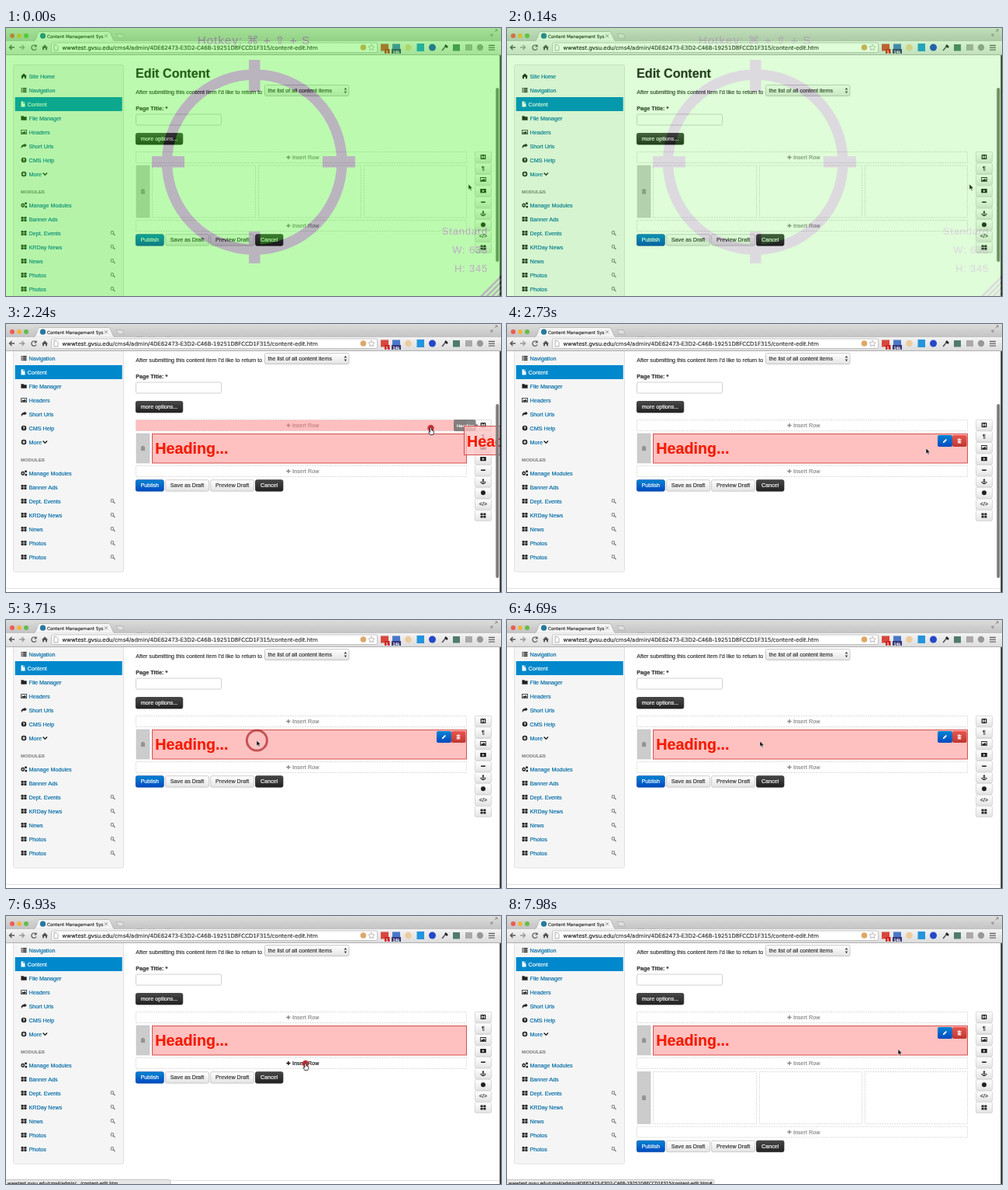
Recreate the animation shown at these times as an HTML page. Size 638x345 px, loop 8 s.

```html
<!DOCTYPE html>
<html lang="en">
<head>
<meta charset="utf-8">
<title>Content editor</title>
<style>
html, body { margin: 0; width: 100%; height: 100%; overflow: hidden; background: #fff; }
svg { display: block; width: 638px; height: 345px; }
text { font: 7.2px "Liberation Sans", Arial, sans-serif; color: #333; fill: currentColor; stroke: currentColor; stroke-width: .18px; white-space: pre; }
.ui { font-family: "DejaVu Sans", sans-serif; }
.link { color: #006aa6; }
.bold { font-weight: bold; }
.dash { fill: none; stroke: #d2d2d2; stroke-width: .8; stroke-dasharray: 2 1.2; }
.big { font-size: 19.7px; font-weight: bold; color: #f31c00; }
.sight text { color: inherit; font-size: 13px; letter-spacing: .8px; text-anchor: end; }
.sight .hot { font-size: 15px; letter-spacing: 1.1px; text-anchor: middle; font-family: "Liberation Sans", "DejaVu Sans", sans-serif; }
#sight { mix-blend-mode: multiply; }
</style>
</head>
<body>
<svg id="stage" viewBox="0 0 638 345" xmlns="http://www.w3.org/2000/svg"></svg>
<script>
const disc = 'M-3.3 0a3.3 3.3 0 1 0 6.6 0a3.3 3.3 0 1 0-6.6 0Z';
const icons = {
  home: 'M-4 .3L0-3.5 4 .3H3V3.3H1V1H-1V3.3H-3V.3Z',
  list: 'M-3.5-3h1.3v1.4h-1.3zM-1.5-3h5v1.4h-5zM-3.5-.7h1.3v1.4h-1.3zM-1.5-.7h5v1.4h-5zM-3.5 1.6h1.3v1.4h-1.3zM-1.5 1.6h5v1.4h-5z',
  file: 'M-2.5-3.4H.3V-.8H2.5V3.4H-2.5ZM.9-3.4L2.5-1.5H.9Z',
  folder: 'M-3.6-2.7H-.6L.2-1.8H3.6V2.7H-3.6Z',
  image: 'M-3.8-3H3.8V3H-3.8ZM-3-2.2V2.2H3V-2.2ZM-2.6 1.8V.8L-1.3-.4-.5.3 1-1.3 2.6.5V1.8Z',
  share: 'M3.8-1L.8-3.4V-2C-2.5-2-4 0-3 3.2-2.3 1 -1 .3.8.3V1.6Z',
  help: disc + 'M-1.3-.6Q-1.2-2 .1-2 1.5-1.8 1.4-.7 1.3 0 .5.4V.9H-.5V0Q.5-.4.4-.8 0-1.4-.4-.6ZM-.5 1.4H.5V2.3H-.5Z',
  more: disc + 'M-.6-2H.6V-.6H2V.6H.6V2H-.6V.6H-2V-.6H-.6Z',
  gears: 'M-3.8.3L-3-1.8-1.3-2.4.4-1.8 1.2.3.4 2.2-1.3 3-3 2.2ZM-2.3.3a1 1 0 1 0 2 0a1 1 0 1 0-2 0ZM1-2.2a1.5 1.5 0 1 0 3 0a1.5 1.5 0 1 0-3 0ZM1.4 2.2a1.4 1.4 0 1 0 2.8 0a1.4 1.4 0 1 0-2.8 0Z',
  grid: 'M-3.4-3h3v2.7h-3zM.4-3h3v2.7h-3zM-3.4.3h3v2.7h-3zM.4.3h3v2.7h-3z',
  search: 'M-2.9-.6a2.3 2.3 0 1 0 4.6 0a2.3 2.3 0 1 0-4.6 0ZM-2-.6a1.4 1.4 0 1 1 2.8 0a1.4 1.4 0 1 1-2.8 0ZM.6 1.4L1.4.6 3.4 2.6 2.6 3.4Z',
  trash: 'M-2.6-2.2H-1V-3H1V-2.2H2.6V-1.5H-2.6ZM-2.2-1H2.2V3H-2.2ZM-1.4-.4V2.4H-1V-.4ZM-.2-.4V2.4H.2V-.4ZM1-.4V2.4H1.4V-.4Z',
  pencil: 'M-2.7 2.7L-2.3 1 1.2-2.5 2.5-1.2-1 2.3Z',
  head: 'M-3.3-3H3.3V3H-3.3ZM-2-2V2H-1V.5H1V2H2V-2H1V-.5H-1V-2Z',
  play: 'M-3.8-2.7H3.8V2.7H-3.8ZM-1-1.5V1.5L1.6 0Z',
  minus: 'M-2.8-.8H2.8V.8H-2.8Z',
  anchor: 'M-.5-1.3A1.1 1.1 0 1 1 .5-1.3V-.8H1.6V.1H.5V2.2Q2 2 2.2 1L1.6 1 3.2-.3 3.6 1.8 3 1.5Q2 3.4 0 3.4T-3 1.5L-3.6 1.8-3.2-.3-1.6 1-2.2 1Q-2 2-.5 2.2V.1H-1.6V-.8H-.5Z',
  plus: 'M-.7-2.6H.7V-.7H2.6V.7H.7V2.6H-.7V.7H-2.6V-.7H-.7Z',
  chevron: 'M-3.2-1L-2.2-2 0 .2 2.2-2 3.2-1 0 2.2Z'
};
const icon = (n, x, y, fill = '#222') => `<path d="${icons[n]}" transform="translate(${x} ${y})" fill="${fill}" fill-rule="evenodd"/>`;
// y is the middle of the line
const text = (s, x, y, more = '') => `<text x="${x}" y="${y + 2.6}" ${more}>${s}</text>`;
const rect = (x, y, w, h, fill, more = '') => `<rect x="${x}" y="${y}" width="${w}" height="${h}" fill="${fill}" ${more}/>`;
const circle = (x, y, r, fill, more = '') => `<circle cx="${x}" cy="${y}" r="${r}" fill="${fill}" ${more}/>`;
const path = (d, stroke, w = 1, fill = 'none') => `<path d="${d}" stroke="${stroke}" stroke-width="${w}" fill="${fill}"/>`;
const group = (id, body) => `<g id="${id}">${body}</g>`;
const grad = (id, a, b) => `<linearGradient id="${id}" x2="0" y2="1"><stop stop-color="${a}"/><stop offset="1" stop-color="${b}"/></linearGradient>`;
const button = (s, x, w, y, fill, ink, edge) =>
  rect(x, y, w, 14.5, fill, `rx="2" stroke="${edge}" stroke-width=".7"`) + text(s, x + w / 2, y + 7.1, `text-anchor="middle" style="color:${ink}"`);
const dashed = (x, y, w, h) => `<rect class="dash" x="${x}" y="${y}" width="${w}" height="${h}"/>`;
const insertRow = (y, id) => dashed(167.5, y, 426, 14) + `<g id="${id}" style="color:#888">` +
  icon('plus', 364, y + 7, 'currentColor') + text('Insert Row', 369, y + 7, 'style="color:inherit"') + '</g>';
const handle = (y, h) => rect(168, y, 17, h, '#ccc', 'stroke="#bbb" stroke-width=".5"') + icon('trash', 176.5, y + h / 2, '#777');
const columns = y => handle(y, 67) + [188.5, 325.5, 461.5].map(x => dashed(x, y, x < 189 ? 133 : 132, 67)).join('');

const host = 'wwwtest.gvsu.edu', rest = '/content-edit.htm';
const full = '/cms4/admin/4DE62473-E3D2-C46B-19251D8FCCD1F315' + rest;

const chrome = rect(0, 0, 638, 16.5, 'url(#bar)') + rect(0, 16.5, 638, 18, 'url(#tools)') +
  path('M0 34.5H638', '#b0b0b0') + path('M0 16.5H638', '#b0b0b0', .7) +
  circle(8, 10, 3, '#ee5b52') + circle(17, 10, 3, '#f0b63f') + circle(26, 10, 3, '#66bd4c') +
  path('M35 16.8Q38 16.5 39 12.5L41 6.5Q41.5 4.5 44 4.5H131Q133.5 4.5 134.5 6.5L137 12.5Q138 16.5 141 16.8', '#aaa', .7, '#f4f4f4') +
  circle(47.5, 10.2, 3.6, '#28799f') + text('Content Management Sys', 53, 9.9, 'class="ui" style="font-size:5.6px"') +
  path('M127 8.2L131 12.2M131 8.2L127 12.2', '#888', .9) + path('M142 7.5H150L152.5 13H144.5Z', '#aaa', .7, '#dedede') +
  path('M625 10L628 7M630 5L633 2M625 7.5V10H627.5M630.5 2H633V4.5', '#777', .8) +
  path('M11 25H5M7.5 22L4.5 25 7.5 28', '#555', 1.4) + path('M17 25H23M20.5 22L23.5 25 20.5 28', '#999', 1.4) +
  path('M38.8 23.5A3.2 3.2 0 1 0 39 26.5M39 21.5V24H36.5', '#555', 1.2) + icon('home', 50, 25, '#555') +
  rect(58.5, 19, 420, 12.5, '#fff', 'rx="2" stroke="#b5b5b5" stroke-width=".8"') +
  path('M62 21.5H65L67 23.5V29H62Z', '#999', .8) +
  `<text class="ui" x="72.5" y="27.6" style="font-size:7.03px;color:#222">${host}<tspan fill="#444">${full}</tspan></text>` +
  circle(460.5, 25, 3.8, '#dfa766') + path('M471 21L472.2 23.7 475 24 472.9 25.9 473.5 28.8 471 27.3 468.5 28.8 469.1 25.9 467 24 469.8 23.7Z', '#aaa', .8) +
  rect(483, 20.5, 10, 9, '#d8473d') + rect(498, 20.5, 10, 9, '#4b77c9') +
  rect(488, 27, 6.5, 6, '#c22') + text('1', 489.6, 30, 'style="font-size:5.5px;color:#fff"') +
  rect(497, 27, 12, 6, '#383875') + text('14k', 498.5, 30, 'style="font-size:5.5px;color:#fff"') +
  circle(518.5, 25, 4.2, '#eccb9d') + rect(529.5, 20, 9.5, 10, '#2495dc') + circle(549.5, 25, 4.5, '#2648c8') +
  path('M562 29L567 23', '#555', 1.6) + path('M566 22L569 25', '#222', 2.5) +
  rect(576, 21, 9, 8.5, '#507b6c') + rect(592, 21, 9, 8, '#aaa') + circle(611, 25, 4.2, '#999') +
  path('M622 22.5H630M622 25.3H630M622 28.1H630', '#666', 1.3);

const menu = [['home', 'Site Home', 62], ['list', 'Navigation', 80], ['file', 'Content', 98], ['folder', 'File Manager', 116],
  ['image', 'Headers', 134], ['share', 'Short Urls', 152], ['help', 'CMS Help', 170], ['more', 'More', 188],
  ['gears', 'Manage Modules', 228], ['grid', 'Banner Ads', 246], ['grid', 'Dept. Events', 264], ['grid', 'KRDay News', 282],
  ['grid', 'News', 300], ['grid', 'Photos', 318], ['grid', 'Photos', 336]];
const sidebar = rect(9.5, 47.5, 142, 307.5, '#f5f5f5', 'rx="2" stroke="#e0e0e0"') + rect(11.7, 89, 138, 18, '#0088cc') +
  menu.map(([n, s, y]) => {
    const on = s == 'Content';
    return icon(n, on ? 22 : 23, y, on ? '#fff' : '#222') +
      text(s, on ? 27.5 : 29.5, y, on ? 'style="color:#fff"' : 'class="link"') + (y > 250 ? icon('search', 137.5, y, '#777') : '');
  }).join('') + icon('chevron', 50.3, 188) + text('MODULES', 19, 210, 'class="bold" style="font-size:6.2px;color:#888"');

const tools = ['head', '¶', 'image', 'play', 'minus', 'anchor', '', '&lt;/&gt;', 'grid'];
const palette = tools.map((n, i) => {
  const y = 166 + i * 14.55;
  return rect(604.5, y - 6.6, 21, 13.6, 'url(#pale)', 'rx="1.5" stroke="#ccc" stroke-width=".7"') +
    (icons[n] ? icon(n, 615, y) : n ? text(n, 615, y, 'text-anchor="middle"') : circle(615, y, 3, '#222'));
}).join('');

const heading = handle(177, 38) + rect(188.5, 177.5, 405, 37.5, '#ffc0c0', 'stroke="#d4504c"') +
  '<text class="big" x="192.3" y="203.2">Heading...</text>' +
  group('edit', rect(555, 179, 19, 15, 'url(#blue)', 'rx="2"') + rect(574, 179, 18.5, 15, 'url(#red)', 'rx="2"') +
    icon('pencil', 564.5, 186.5, '#fff') + icon('trash', 583, 186.5, '#fff'));

const page = sidebar + text('Edit Content', 167, 61, 'class="bold" style="font-size:16.15px;color:#222"') +
  text('After submitting this content item I\'d like to return to', 167.2, 82.5) +
  rect(333.5, 73.5, 108.5, 14, 'url(#pale)', 'rx="2" stroke="#bbb" stroke-width=".8"') + text('the list of all content items', 337.5, 80.5) +
  path('M435.7 79.5L437.5 76.7 439.3 79.5ZM435.7 81.5L437.5 84.3 439.3 81.5Z', 'none', 0, '#444') +
  text('Page Title: *', 167.2, 103, 'class="bold"') + rect(167.5, 111, 110, 14, '#fff', 'rx="1.5" stroke="#ccc" stroke-width=".9"') +
  button('more options...', 167.3, 60.5, 135.5, 'url(#dark)', '#fff', '#222') +
  insertRow(159.5, 'add1') + rect(167.5, 159.5, 426, 14, '#ff8080', 'id="target" fill-opacity=".5"') +
  group('empty', columns(177)) + group('filled', heading) + group('mid', insertRow(218.5, 'add2') + columns(236.5)) +
  group('lower', insertRow(247.5, 'add3') + button('Publish', 167.3, 36, 265.7, 'url(#blue)', '#fff', '#0049a8') +
    button('Save as Draft', 205.6, 56, 265.7, 'url(#pale)', '#333', '#bbb') + button('Preview Draft', 263.6, 56, 265.7, 'url(#pale)', '#333', '#bbb') +
    button('Cancel', 321.5, 35.5, 265.7, 'url(#dark)', '#fff', '#222') + path('M0 405.5H636', '#e3e3e3')) +
  palette +
  group('tip', rect(577, 159, 28.5, 15, '#777', 'rx="2" opacity=".9"') + path('M605.5 164L608.5 166.5 605.5 169Z', 'none', 0, '#777') +
    text('Heading', 581, 166.5, 'style="font-size:6px;color:#fff"')) +
  group('ghost', rect(590.5, 167.5, 60, 37, '#ffc0c0', 'stroke="#d4504c" fill-opacity=".75"') + '<text class="big" x="594" y="193.5">Heading...</text>');

// Recorder's viewfinder: a green tint with the marks cut out of it
const sight = (color, id = '') => `<g class="sight" ${id} style="color:${color}" stroke="currentColor">` +
  circle(320.2, 172.7, 112.7, 'none', 'stroke-width="13.4"') +
  '<path d="M188 172.3H230M408 172.3H450M320.3 41V82M320.3 262V303" stroke-width="14.5"/>' +
  '<text class="hot" x="319.5" y="21">Hotkey: ⌘ + ⇧ + S</text>' +
  text('Standard', 621, 263.3) + text('W: 638', 621, 287.8) + text('H: 345', 621, 311.2) +
  '<path d="M612 346L639 319M619 346L639 326M626 346L639 333M633 346L639 340" stroke-width="2.6"/></g>';

const stage = document.getElementById('stage');
stage.innerHTML = '<defs>' + grad('bar', '#dcdcdc', '#c4c4c4') + grad('tools', '#f4f4f4', '#dcdcdc') + grad('pale', '#fff', '#e4e4e4') +
  grad('blue', '#0584d2', '#0249c0') + grad('red', '#ea5650', '#bd362f') + grad('dark', '#474747', '#222') +
  `<mask id="hole">${rect(0, 0, 638, 345, '#fff') + sight('#000')}</mask></defs>` +
  rect(0, 0, 638, 345, '#fff') + group('page', page) + rect(631.3, 103, 4, 224, '#7d7d7d', 'id="thumb" rx="2"') +
  rect(636.4, 35, 1.6, 310, '#222') + chrome +
  group('status', rect(-2, 339.5, 10, 10, '#e6e6e6', 'id="statusBox" rx="2" stroke="#bbb" stroke-width=".8"') +
    '<text class="ui" id="url" x="2" y="346.3" style="font-size:5.5px"></text>') +
  circle(0, 0, 0, 'none', 'id="ring" stroke="#b02a30" stroke-width="3"') + circle(0, 0, 0, '#c0222a', 'id="dot" opacity=".9"') +
  group('arrow', path('M0 0V7.2L1.7 5.6 2.8 8.2 4.1 7.7 3 5.2H5.3Z', '#fff', .5, '#111')) +
  group('hand', path('M-1 0Q0-1.2 1 0V2.8L3.8 3.7V6.5L3 8.6H-1L-3 5.2-2.3 4.4-1 5.4Z', '#111', .8, '#fff')) +
  rect(0, 0, 638, 345, '#27ef00', 'id="tint" fill-opacity=".31" mask="url(#hole)"') + sight('#bab4be', 'id="sight"');

const el = {};
stage.querySelectorAll('[id]').forEach(e => el[e.id] = e);
const set = (id, attrs) => { for (const k in attrs) el[id].setAttribute(k, attrs[k]); };
const show = (id, a) => set(id, { opacity: +a });
const move = (id, x, y) => set(id, { transform: `translate(${x} ${y})` });
const hover = (id, on) => { el[id].style.color = on ? '#111' : '#888'; };

// Eased value at time t along keys [time, ...values]
function track(t, keys) {
  const i = keys.findIndex(k => k[0] > t);
  if (i < 0) return keys[keys.length - 1].slice(1);
  if (i == 0) return keys[0].slice(1);
  const a = keys[i - 1], b = keys[i], u = (t - a[0]) / (b[0] - a[0]), e = u * u * (3 - 2 * u);
  return a.slice(1).map((v, j) => v + (b[j + 1] - v) * e);
}
const pointer = [[910, 596, 201], [1190, 605.5, 140], [1540, 613, 132], [2030, 613, 132], [2240, 547.5, 134], [2660, 540, 160],
  [3290, 540, 160], [3570, 323, 155], [3710, 323, 155], [4060, 326, 156], [5040, 326, 156], [5460, 386, 190], [7630, 386, 190], [7980, 504, 171.5]];
const presses = [[1750, 2240], [3430, 3563], [5810, 6960]];

function draw(t) {
  const [x, y] = track(t, pointer), [scroll] = track(t, [[840, 0], [1120, 36]]);
  const placed = t >= 2170, added = t >= 7070;
  const onHeading = placed && y > 141 && y < 179, onAdd = t > 5000 && y > 182;
  const record = Math.max(0, 1 - t / 280);
  show('tint', record);
  show('sight', record);
  move('page', 0, -scroll);
  move('thumb', 0, -26 * (1 - scroll / 36));
  show('thumb', track(t, [[3220, 1], [3500, 0]])[0]);
  show('empty', !placed);
  show('filled', placed);
  show('edit', onHeading);
  show('mid', added);
  move('lower', 0, added ? 59.5 : placed ? -29 : 0);
  hover('add2', onAdd);
  hover('add3', onAdd && !added);
  const [drag] = track(t, [[2100, 0], [2240, 1], [2520, 0]]);
  show('target', drag);
  show('ghost', drag);
  show('tip', t >= 1540 && t < 2400);

  show('status', track(t, [[5250, 0], [5460, 1]])[0]);
  set('statusBox', { width: track(t, [[7070, 214], [7490, 269]])[0] });
  el.url.textContent = host + (t < 7280 ? '/cms4/admin/…' + rest : full + '#');

  const press = presses.find(p => t >= p[0] && t <= p[1]);
  set('dot', { cx: x, cy: y, r: press ? (t - press[0] < 70 ? 2.8 : 4.2) : 0 });
  const last = presses.find(p => t > p[1] && t < p[1] + 490);
  const age = last ? t - last[1] : 0;
  const [rx, ry] = last ? track(last[1], pointer) : [0, 0];
  set('ring', { cx: rx, cy: ry, r: age * .0886, opacity: last ? 1 - age / 540 : 0 });

  const hand = onAdd || t >= 1540 && t < 2400;
  show('hand', hand);
  show('arrow', !hand);
  move('hand', x, y);
  move('arrow', x, y);
}
const STEP = 70, LOOP = 8000, start = performance.now();
function tick() {
  const t = (performance.now() - start) % LOOP;
  draw(Math.floor(t / STEP) * STEP);
  requestAnimationFrame(tick);
}
tick();
</script>
</body>
</html>
```
